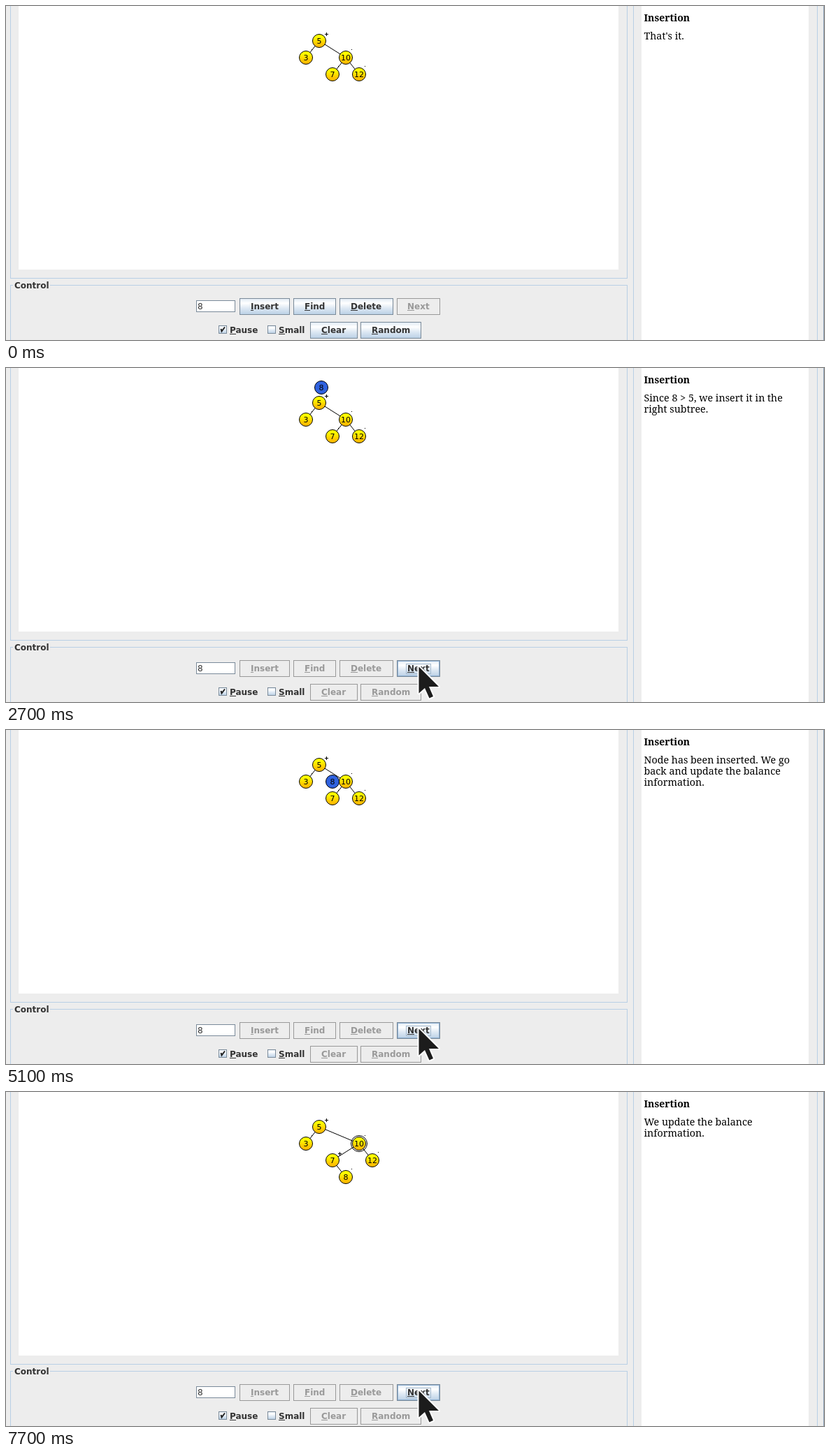
Animation, 1170 px wide and 479 px high, one loop 8 s. Source, as an HTML page with a canvas:

```html
<!DOCTYPE html>
<html lang="en">
<head>
<meta charset="utf-8">
<title>Tree insertion</title>
<style>
html, body { margin: 0; width: 100%; height: 100%; overflow: hidden; background: #ededed; }
canvas { display: block; width: 1170px; height: 479px; }
</style>
</head>
<body>
<canvas id="stage" width="1170" height="479"></canvas>
<script>
const ctx = document.getElementById('stage').getContext('2d');
const LOOP = 8000;
const SANS = '"DejaVu Sans", sans-serif';
const SERIF = '"Noto Serif", serif';
const PANEL = '#ededed', LINE = '#b8cfe5', EDGE = '#7a8a99', GRAY = '#999999', INK = '#333333';

// Linear progress from 0 to 1, advancing in visible steps.
function glide(t, start, length = 500, step = 100) {
  const held = Math.floor(t / step) * step;
  return Math.min(1, Math.max(0, (held - start) / length));
}
const mix = (a, b, p) => a + (b - a) * p;
const mixPoint = (a, b, p) => [mix(a[0], b[0], p), mix(a[1], b[1], p)];

function rect(x, y, w, h, color) {
  ctx.fillStyle = color;
  ctx.fillRect(x, y, w, h);
}
function frame(x, y, w, h, color) {
  ctx.strokeStyle = color;
  ctx.lineWidth = 1;
  ctx.strokeRect(x + 0.5, y + 0.5, w - 1, h - 1);
}
function path(points, color, width) {
  ctx.beginPath();
  for (const [x, y] of points) ctx.lineTo(x, y);
  ctx.strokeStyle = color;
  ctx.lineWidth = width;
  ctx.stroke();
}
function circle([x, y], r) {
  ctx.beginPath();
  ctx.arc(x, y, r, 0, 2 * Math.PI);
  ctx.strokeStyle = '#000';
  ctx.lineWidth = 1;
  ctx.stroke();
}
function text(s, x, y, font, color, align = 'left') {
  ctx.font = font;
  ctx.fillStyle = color;
  ctx.textAlign = align;
  ctx.fillText(s, x, y);
}

// Bold label with its first letter underlined.
function label(s, x, y, color) {
  text(s, x, y, `bold 12px ${SANS}`, color);
  rect(x, y + 1, Math.round(ctx.measureText(s[0]).width), 1, color);
}

function gloss(x, y, w, h) {
  const g = ctx.createLinearGradient(0, y, 0, y + h);
  g.addColorStop(0, '#dde8f3');
  g.addColorStop(0.3, '#ffffff');
  g.addColorStop(0.6, '#dde8f3');
  g.addColorStop(1, LINE);
  rect(x, y, w, h, g);
}

function button(s, x, y, w, { on = true, down = false, hover = false, focus = false }) {
  const h = 24;
  if (!on) {
    frame(x, y, w, h, GRAY);
  } else if (down) {
    rect(x, y, w, h, LINE);
    frame(x, y, w, h, EDGE);
    rect(x + 1, y + 1, w - 2, 1, EDGE);
    rect(x + 1, y + 1, 1, h - 2, EDGE);
  } else {
    gloss(x, y, w, h);
    frame(x, y, w, h, EDGE);
    if (hover) frame(x + 1, y + 1, w - 2, h - 2, '#8fb0d2');
  }
  ctx.font = `bold 12px ${SANS}`;
  const tw = Math.round(ctx.measureText(s).width);
  const tx = x + Math.floor((w - tw) / 2);
  if (focus) frame(tx - 2, y + 5, tw + 4, 15, '#a3b8cc');
  label(s, tx, y + 16, on ? INK : GRAY);
}

function checkbox(s, x, checked) {
  gloss(x, 458, 12, 12);
  frame(x, 458, 12, 12, EDGE);
  if (checked) path([[x + 3.5, 463], [x + 4.5, 466.5], [x + 9, 460.5]], '#222', 2);
  label(s, x + 16, 469, INK);
}

// Each click shows its message on release; the first is on Insert, the rest on Next.
const clicks = [
  { press: 900, release: 1100, lines: ['We start at the root.'] },
  { press: 2500, release: 2700, lines: ['Since 8 > 5, we insert it in the', 'right subtree.'] },
  { press: 3900, release: 4000, lines: ['Since 8 < 10, we insert it in the', 'left subtree.'] },
  { press: 5000, release: 5100,
    lines: ['Node has been inserted. We go', 'back and update the balance', 'information.'] },
  { press: 6700, release: 6900, lines: ['We update the balance', 'information.'] },
  { press: 7500, release: 7600, lines: ['We update the balance', 'information.'] }
];
const [START, RIGHT, , , UPDATE] = clicks.map(c => c.release);
const LINK = 5300, CLIMB = 7700;

function drawControls(t) {
  const idle = { on: t < START };
  const down = clicks.some(c => t >= c.press && t < c.release);
  text('Control', 12, 405, `bold 12px ${SANS}`, INK);

  rect(272, 422, 56, 17, '#fff');
  frame(272, 422, 56, 17, EDGE);
  text('8', 274, 435, `12px ${SANS}`, INK);

  button('Insert', 334, 419, 72, {
    on: idle.on, down, hover: t >= 400, focus: t >= clicks[0].press && t < RIGHT
  });
  button('Find', 411, 419, 61, idle);
  button('Delete', 477, 419, 77, idle);
  button('Next', 559, 419, 62, { on: !idle.on, down, hover: t >= 1900, focus: t >= RIGHT });
  button('Clear', 435, 453, 68, idle);
  button('Random', 507, 453, 87, idle);
  checkbox('Pause', 304, true);
  checkbox('Small', 374, false);
}

function drawPanels() {
  rect(0, 0, 1170, 479, PANEL);
  rect(18, 0, 858, 378, '#fff');
  rect(909, 0, 239, 479, '#fff');
  frame(6, -5, 883, 396, LINE);
  frame(6, 400, 883, 90, LINE);
  rect(10, 399, 53, 3, PANEL);
  frame(897, -5, 264, 490, LINE);
  rect(1169, 0, 1, 479, '#8fa3b8');
}

function drawMessage(t) {
  const last = clicks.filter(c => t >= c.release).pop();
  const lines = last ? last.lines : ["That's it."];
  text('Insertion', 912.5, 22, `bold 14px ${SERIF}`, '#000');
  lines.forEach((s, i) => text(s, 912.5, 48 + 16 * i, `14.3px ${SERIF}`, '#000'));
}

function node(key, [x, y], blue) {
  let fill = '#2f62df';
  if (!blue) {
    fill = ctx.createLinearGradient(0, y - 10, 0, y + 10);
    fill.addColorStop(0.2, '#ffff00');
    fill.addColorStop(0.8, '#ffbe00');
  }
  ctx.beginPath();
  ctx.arc(x, y, 9.5, 0, 2 * Math.PI);
  ctx.fillStyle = fill;
  ctx.fill();
  circle([x, y], 9.5);
  text(key, x, y + 4, `11px ${SANS}`, '#000', 'center');
}

function balance([x, y], plus) {
  if (plus) {
    rect(x + 8, y - 10, 5, 1, '#000');
    rect(x + 10, y - 12, 1, 5, '#000');
  } else {
    rect(x + 8, y - 12, 1, 1, '#000');
  }
}

// Nodes sit on a grid: one column per key in order, one row per depth.
const cell = (col, row) => [429 + 19 * col, 50 + 24 * row];

function newNodeAt(t) {
  const stops = [[13, -11], cell(1, -1), cell(3, 0), cell(2, 1), cell(3, 3)];
  const moves = [glide(t, 1050), glide(t, 2650), glide(t, 3975), glide(t, 5200, 400)];
  return moves.reduce((at, p, i) => mixPoint(at, stops[i + 1], p), stops[0]).map(Math.floor);
}

function drawTree(t) {
  const linked = t >= LINK;
  const shift = glide(t, 5200, 400);
  const at = {
    3: cell(0, 1), 5: cell(1, 0), 7: cell(2, 2),
    10: cell(3 + shift, 1), 12: cell(4 + shift, 2), 8: newNodeAt(t)
  };
  const edges = [[5, 3], [5, 10], [10, 7], [10, 12]];
  const keys = [5, 3, 10, 7, 12];
  if (linked) {
    edges.push([7, 8]);
    keys.push(8);
  }
  ctx.save();
  ctx.beginPath();
  ctx.rect(18, 0, 858, 378);
  ctx.clip();
  for (const [a, b] of edges) path([at[a], at[b]], '#000', 1);
  for (const k of keys) {
    node(k, at[k]);
    balance(at[k], k === 5 || (k === 7 && t >= UPDATE));
  }
  if (t >= START && !linked) node(8, at[8], true);
  if (t >= UPDATE) circle(at[t < CLIMB ? 7 : 10], 11.5);
  ctx.restore();
}

// The hand slows into each target and sags below the straight line.
const legs = [
  { start: 300, step: 100, from: [377, 455], to: [355, 419], sag: 0 },
  { start: 1500, step: 100, from: [355, 419], to: [571, 448], sag: 16 },
  { start: 1900, step: 200, from: [571, 448], to: [590.5, 428.5], sag: 4 }
];
const arrow = [[0, 0], [0, 38], [8.5, 30.5], [15, 45], [20.5, 42.5], [14.5, 28.5], [28.5, 28.5]];

function drawPointer(t) {
  const leg = legs.filter(l => t >= l.start).pop();
  if (!leg) return;
  const p = glide(t - leg.start, 0, 400, leg.step);
  const [x, y] = mixPoint(leg.from, leg.to, p * (2 - p));
  ctx.save();
  ctx.translate(x, y + 4 * leg.sag * p * (1 - p));
  ctx.lineJoin = 'round';
  path([...arrow, arrow[0], arrow[1]], '#fff', 4);
  ctx.fillStyle = '#1c1c1c';
  ctx.fill();
  ctx.restore();
}

function draw(t) {
  drawPanels();
  drawTree(t);
  drawMessage(t);
  drawControls(t);
  drawPointer(t);
}

const begin = performance.now();
function tick() {
  draw((performance.now() - begin) % LOOP);
  requestAnimationFrame(tick);
}
tick();
</script>
</body>
</html>
```
